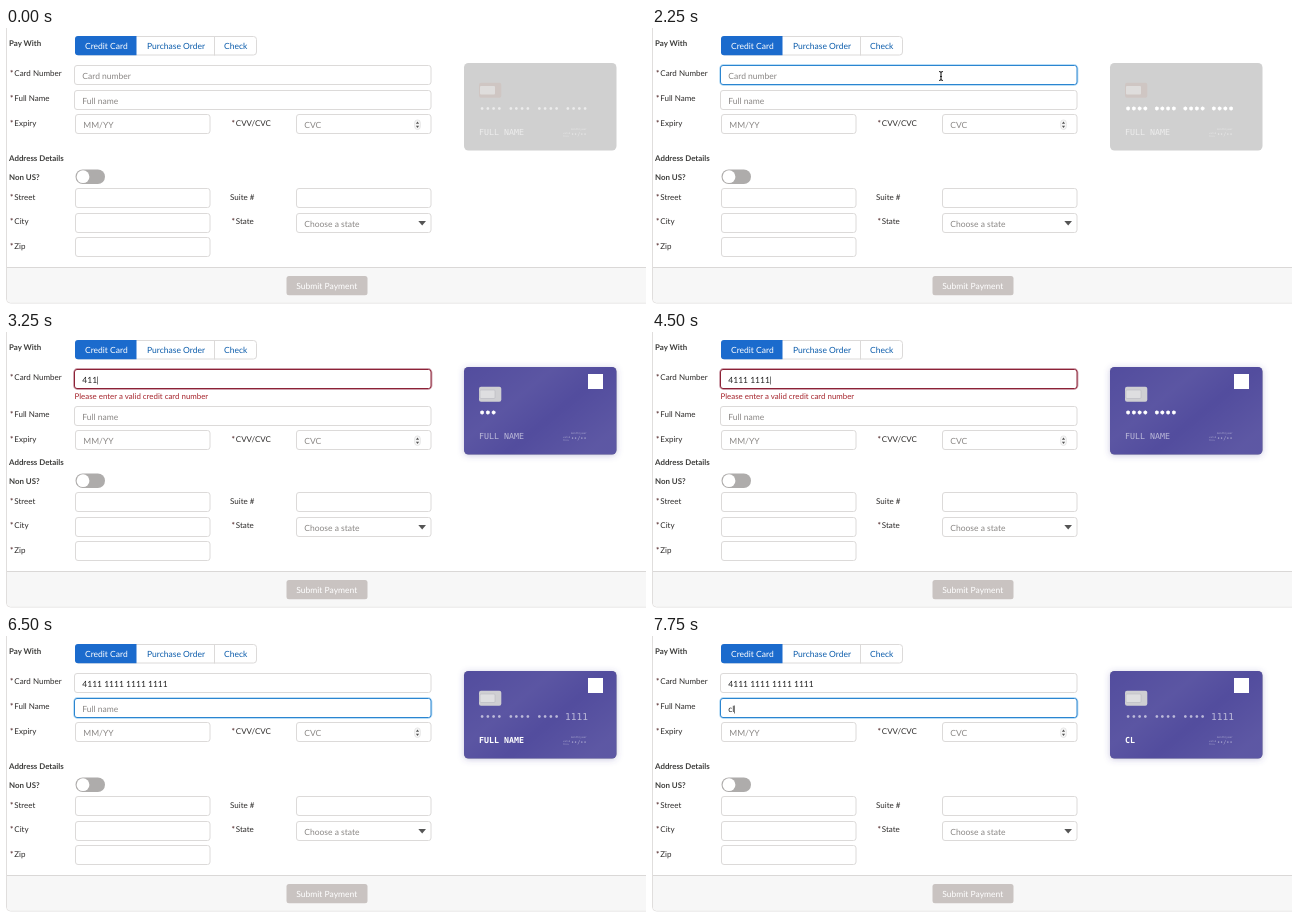
Recreate the animation shown at these times as an HTML page. Size 640 by 276 pixels, loop 8000 ms.

```html
<!DOCTYPE html>
<html lang="en">
<head>
<meta charset="utf-8">
<title>Payment form</title>
<style>
html, body { margin: 0; width: 100%; height: 100%; overflow: hidden; background: #fff; }
svg { display: block; width: 640px; height: 276px; font: 8.5px Lato, sans-serif; fill: #222; text-rendering: geometricPrecision; }
.label { font-size: 8px; fill: #2f2d2c; }
.bold { font-size: 7.9px; font-weight: 700; fill: #3e3e3c; }
.hint { fill: #8a8785; }
.star { font-size: 8px; font-weight: 700; fill: #5f3a3b; }
.error { font-size: 7.9px; fill: #a6262e; }
.link { fill: #0b5cab; }
.white { fill: #fff; }
.mono { font-family: "DejaVu Sans Mono", monospace; fill: #fff; white-space: pre; }
</style>
</head>
<body>
<svg id="stage" viewBox="0 0 640 276"></svg>
<script>
const STEP = 250, LOOP = 8000;
const FOCUS_NUMBER = 1500, FIRST_DIGIT = 2750, FOCUS_NAME = 6500;
const NUMBER = '4111111111111111';
const stage = document.getElementById('stage');

const text = (x, y, value, cls = '', extra = '') =>
  `<text x="${x}" y="${y}" class="${cls}" ${extra}>${value}</text>`;
const rect = (x, y, w, h, fill, r = 0, extra = '') =>
  `<rect x="${x}" y="${y}" width="${w}" height="${h}" rx="${r}" fill="${fill}" ${extra}/>`;
const path = (d, fill, extra = '') => `<path d="${d}" fill="${fill}" ${extra}/>`;
const group = s => s.replace(/(.{4})(?=.)/g, '$1 ');

function label(x, y, value, required = true) {
  return required ? text(x, y + 3.4, '*', 'star') + text(x + 4.3, y + 3.4, value, 'label')
                  : text(x, y + 3.4, value, 'label');
}

function field(x, y, w, { value = '', hint = '', focus = false, error = false } = {}) {
  const color = error ? '#8c2236' : focus ? '#2b85d0' : '#dcdad9';
  const glow = focus ? rect(x, y, w, 19, 'none', 3,
    `stroke="${error ? '#b9788a' : '#9fd0f3'}" stroke-width="2.8" opacity=".7"`) : '';
  const caret = focus && value ? '<tspan dx="-.8">|</tspan>' : '';
  return glow + rect(x, y, w, 19, '#fff', 2.5, `stroke="${color}"`) +
    text(x + 7.8, y + 13, (value || hint) + caret, value ? '' : 'hint');
}

function tabs() {
  return rect(69.5, 8.5, 181, 18.5, '#fff', 3, 'stroke="#dcdad9"') +
    path('M72 8H130.5V27.3H72Q69 27.3 69 24.3V11Q69 8 72 8Z', '#1b6bcd') +
    path('M208.5 8V27.5', 'none', 'stroke="#dcdad9"') +
    text(79, 21, 'Credit Card', 'white') + text(141, 21, 'Purchase Order', 'link') +
    text(218, 21, 'Check', 'link');
}

function digitsAt(t) {
  if (t < FIRST_DIGIT) return 0;
  if (t <= 4500) return 1 + (t - FIRST_DIGIT) / STEP;
  return Math.min(16, 8 + 2 * (t - 4500) / STEP);
}

function card(t, count, name) {
  const known = count > 0;
  const mix = Math.min(1, Math.max(0, (t - FIRST_DIGIT) / 400));
  const onNumber = t >= FOCUS_NUMBER && t < FOCUS_NAME, onName = t >= FOCUS_NAME;
  const shownNumber = known
    ? group('•'.repeat(Math.min(12, count)) + NUMBER.slice(12, count))
    : group('•'.repeat(16));
  const style = (on, size) =>
    `font-size="${size}" ${on ? 'font-weight="700"' : 'opacity=".6"'}`;
  const boldDots = onNumber ? ' stroke="#fff" stroke-width=".5"' : '';
  return rect(458, 35, 152.5, 87.5, known ? '#a9a9a9' : '#d0d0d0', 4.5,
      known ? 'filter="url(#shadow)"' : '') +
    (known ? rect(458, 35, 152.5, 87.5, '#4f499c', 4.5, `opacity="${mix}"`) +
      rect(458, 35, 152.5, 87.5, 'url(#sheen)', 4.5) +
      rect(582, 42, 15, 15, '#fff') : '') +
    `<g opacity="${known ? .6 + .4 * mix : 1}">` +
    rect(473, 54.7, 22.3, 15, known ? '#cfcfd2' : '#cfc6c3', 2) +
    rect(474, 58, 15, 8.5, known ? '#dedee0' : '#dfdddc', 1,
      known ? 'stroke="#b9b9c2" stroke-width=".6"' : '') + '</g>' +
    text(473.3, 84, shownNumber, 'mono', style(onNumber, 9.5) + boldDots) +
    text(473, 107.2, name, 'mono', style(onName, 8.3)) +
    '<g opacity=".5">' + text(565, 102, 'month/year', 'mono', 'font-size="2.6"') +
    text(557, 105.5, 'valid', 'mono', 'font-size="2.4"') +
    text(557, 108.5, 'thru', 'mono', 'font-size="2.4"') +
    text(565, 108, '••/••', 'mono', 'font-size="5.2"') + '</g>';
}

function pointer(t) {
  if (t < 250 || t >= FIRST_DIGIT) return '';
  if (t < 1250) {
    const p = (t - 250) / 1000, ease = p * p * (3 - 2 * p);
    return path('M0 0V10L2.4 7.8L4 11.4L5.5 10.7L4 7.2H7Z', '#111',
      `stroke="#fff" stroke-width=".7" transform="translate(${518 - 229 * ease} ${186 - 138 * ease})"`);
  }
  return path('M287 43.5Q289 43.5 289 45V51Q289 52.5 287 52.5M291 43.5Q289 43.5 289 45M289 51Q289 52.5 291 52.5M288 48.5H290',
    'none', 'stroke="#222" stroke-width="1.1"');
}

function draw(t) {
  const count = digitsAt(t);
  const error = count > 0 && count < 16, shift = error ? 12 : 0;
  const onNumber = t >= FOCUS_NUMBER && t < FOCUS_NAME, onName = t >= FOCUS_NAME;
  const typed = 'cl'.slice(0, t >= 7500 ? 2 : t >= 7000 ? 1 : 0);
  const cardName = t >= 7750 ? 'CL' : t >= 7250 ? 'C' : 'FULL NAME';

  stage.innerHTML = `<defs>
    <filter id="shadow" x="-10%" y="-10%" width="120%" height="125%">
      <feDropShadow dx="0" dy="1" stdDeviation="3" flood-color="#4f499c" flood-opacity=".3"/></filter>
    <linearGradient id="sheen" x1="0" y1="0" x2="1" y2=".7">
      <stop offset="0" stop-color="#fff" stop-opacity=".02"/>
      <stop offset=".4" stop-color="#fff" stop-opacity=".07"/>
      <stop offset=".65" stop-color="#fff" stop-opacity=".02"/>
      <stop offset="1" stop-color="#fff" stop-opacity=".08"/></linearGradient></defs>` +
    path('M.5 0V271Q.5 275 4.5 275H640', 'none', 'stroke="#e0dedd"') +
    path('M1 240H640V274.5H4.5Q1 274.5 1 271Z', '#f7f7f7') +
    path('M1 239.5H640', 'none', 'stroke="#dad8d7"') +
    rect(280.5, 248, 81, 19.3, '#c9c3c1', 2.5) + text(290.3, 261, 'Submit Payment', 'white') +

    text(3, 18, 'Pay With', 'bold') + tabs() +
    label(4, 45, 'Card Number') +
    field(68.5, 37.5, 356.5, { value: group(NUMBER.slice(0, count)), hint: 'Card number', focus: onNumber, error }) +
    (error ? text(68.5, 66.5, 'Please enter a valid credit card number', 'error') : '') +
    label(4, 69.7 + shift, 'Full Name') +
    field(68.5, 62.5 + shift, 356.5, { value: typed, hint: 'Full name', focus: onName }) +
    label(4, 94.3 + shift, 'Expiry') +
    field(69.5, 86.5 + shift, 134.5, { hint: 'MM/YY' }) +
    label(225.5, 94.3 + shift, 'CVV/CVC') +
    field(290.5, 86.5 + shift, 134.5, { hint: 'CVC' }) +
    `<g transform="translate(411.5 ${96.7 + shift})">` +
    rect(-2.8, -4.8, 5.6, 9.6, '#f7f7f7', 2.8, 'stroke="#d8d8d8" stroke-width=".6"') +
    path('M-1.6-1L0-3.2L1.6-1ZM-1.6 1L0 3.2L1.6 1Z', '#555') + '</g>' +

    text(3, 133, 'Address Details', 'bold') + text(3, 151.5, 'Non US?', 'bold') +
    rect(69.5, 141.5, 29.5, 14.5, '#aeacab', 7.2) +
    '<circle cx="77" cy="148.7" r="6.4" fill="#fff"/>' +
    label(4, 168.3, 'Street') + field(69.5, 160.5, 134.5) +
    label(224, 168.3, 'Suite #', false) + field(290.5, 160.5, 134.5) +
    label(4, 193, 'City') + field(69.5, 185.5, 134.5) +
    label(225.5, 193, 'State') + field(290.5, 185.5, 134.5, { hint: 'Choose a state' }) +
    path('M412.3 193H420L416.2 197.6Z', '#555') +
    label(4, 217.3, 'Zip') + field(69.5, 209.5, 134.5) +
    card(t, count, cardName) + pointer(t);
}

let last = -1;
function tick(now) {
  const t = Math.floor(now % LOOP / STEP) * STEP;
  if (t !== last) draw(last = t);
  requestAnimationFrame(tick);
}
draw(0);
requestAnimationFrame(tick);
</script>
</body>
</html>
```
